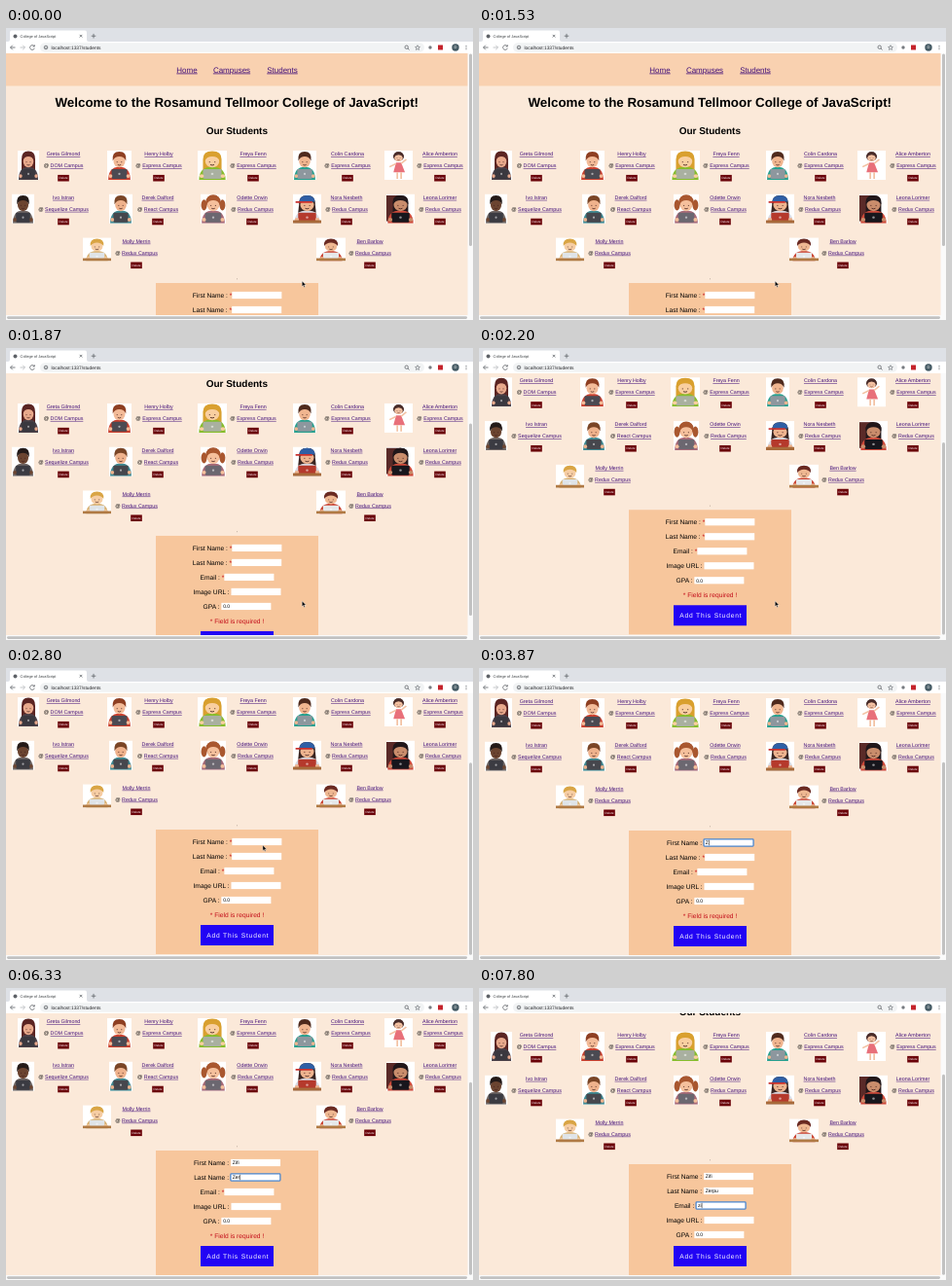
Animation, 480 px wide and 300 px high, one loop 8000 ms. Source, as an HTML page:

```html
<!DOCTYPE html>
<html lang="en">
<head>
<meta charset="utf-8">
<title>College of JavaScript</title>
<style>
  html, body { margin: 0; height: 100%; overflow: hidden; }
  svg { display: block; }
  #stage { width: 100vw; height: 100vh; font-family: "Liberation Sans", Arial, sans-serif; text-rendering: geometricPrecision; }
  .mid { text-anchor: middle; }
  .link { fill: #42107a; text-decoration: underline; }
  .label { font-size: 6.67px; }
  .red { fill: #c20a18; }
</style>
</head>
<body>
<svg id="stage" viewBox="0 0 480 300">
  <defs><clipPath id="view"><rect y="26" width="480" height="269"/></clipPath></defs>
  <rect width="480" height="300" fill="#fbe9d9"/>
  <g clip-path="url(#view)">
    <g id="page">
      <rect y="26" width="475" height="33.5" fill="#f9d1b0"/>
      <g class="link mid" font-size="8">
        <text x="186" y="45.500">Home</text><text x="232" y="45.500">Campuses</text><text x="284" y="45.500">Students</text>
      </g>
      <g class="mid" font-weight="bold">
        <text x="237.3" y="80.800" font-size="13.33">Welcome to the Rosamund Tellmoor College of JavaScript!</text>
        <text x="237.3" y="109.400" font-size="10">Our Students</text>
      </g>
      <g id="cards"></g>
      <rect x="237" y="257.500" width="1" height=".7" fill="#a9978a"/>
      <g id="form" transform="translate(0 262)">
        <rect id="panel" x="154" width="167" height="128" fill="#f7c69c"/>
        <text id="note" class="label mid red" x="237.5" y="89.700">* Field is required !</text>
        <g id="submit">
          <rect x="200" width="75" height="21" fill="#2204f4"/>
          <text class="label" x="206.200" y="12.900" fill="#fff" letter-spacing=".83">Add This Student</text>
        </g>
      </g>
    </g>
  </g>

  <rect x="474.5" y="26" width="5.5" height="270" fill="#fafafa"/>
  <rect id="thumb" x="476" width="3" rx="1.5" fill="#c1c1c1"/>
  <rect y="295" width="480" height="5" fill="#fafafa"/>
  <rect x="1" y="296.3" width="473" height="2.6" rx="1.3" fill="#c1c1c1"/>

  <rect width="480" height="14" fill="#dee1e6"/>
  <path d="M2 14q2 0 2-2V4.500q0-2 2-2h75q2 0 2 2V12q0 2 2 2z" fill="#fff"/>
  <rect y="14" width="480" height="12" fill="#fff"/>
  <rect x="35" y="15.300" width="395" height="9.400" rx="4.700" fill="#f1f3f4"/>
  <circle cx="9.500" cy="8.400" r="2" fill="#5f6368"/>
  <text x="14.600" y="9.900" font-size="3.9" fill="#3c4043">College of JavaScript</text>
  <text x="46.500" y="21.700" font-size="4.850" fill="#202124">localhost:1337/students</text>
  <g fill="none" stroke="#5f6368" stroke-width=".8">
    <path d="M75.700 6.900l2.600 2.600m0-2.600l-2.600 2.600M90 5.900v4.600m-2.300-2.300h4.600"/>
    <path d="M9.500 20h-5m2.300-2.300L4.500 20l2.300 2.300"/>
    <path d="M14.500 20h5m-2.300-2.300l2.300 2.300l-2.300 2.300" stroke="#b5b8bc"/>
    <path d="M29 18.700a2.400 2.400 0 1 0 .3 2M29.300 17.300v1.700h-1.700"/>
    <circle cx="41" cy="20" r="1.800"/><path d="M41 19.600v1.400"/>
    <circle cx="411.700" cy="19.700" r="1.700"/><path d="M413 21l1.500 1.500"/>
    <path d="M423 17.700l.7 1.600l1.700.2l-1.300 1.100l.4 1.800l-1.500-.9l-1.500.9l.4-1.800l-1.300-1.100l1.700-.2z" stroke-width=".6"/>
  </g>
  <circle cx="436" cy="20" r="1.700" fill="#777b80"/>
  <rect x="444" y="17.500" width="5" height="5" fill="#c4232b"/>
  <circle cx="462" cy="20" r="3.700" fill="#455a64"/>
  <text class="mid" x="462" y="21.400" font-size="4" fill="#fff">D</text>
  <g fill="#5f6368"><circle cx="473" cy="18.200" r=".55"/><circle cx="473" cy="20" r=".55"/><circle cx="473" cy="21.800" r=".55"/></g>

  <path id="pointer" d="M0 0v5.600l1.300-1.200l.9 2l.9-.4l-.9-1.900h1.800z" fill="#000" stroke="#fff" stroke-width=".4"/>
</svg>
<script>
const $ = id => document.getElementById(id);
const add = (parent, markup) => parent.insertAdjacentHTML('beforeend', markup);

// name, campus, centre x, row, picture x, picture width, skin, hair, shirt, laptop, look
const students = [
  ['Greta Gilmond', 'DOM', 59, 0, 12, 22, '#e8a98c', '#5b2523', '#4a4048', '#3a383f', 'long'],
  ['Henry Holby', 'Express', 157, 0, 104, 25, '#f3bb98', '#8e3f22', '#c9402f', '#4b4a52', 'short'],
  ['Freya Fenn', 'Express', 254, 0, 197, 30, '#f9cfa0', '#d9a02f', '#86bd2c', '#a9b0a0', 'long'],
  ['Colin Cardona', 'Express', 351, 0, 295, 24, '#f0b58f', '#4f2a1d', '#27a08f', '#8d979e', 'short'],
  ['Alice Amberton', 'Express', 446, 0, 389, 29, '#f3c1a2', '#4a2d2a', '#e8707a', '', 'stand'],
  ['Ivo Istran', 'Sequelize', 59, 1, 6, 23, '#6b4430', '#241a18', '#6f6664', '#3b3b42', 'short'],
  ['Derek Dalford', 'React', 156, 1, 106, 24, '#efb28c', '#7a4526', '#3f8a93', '#46474d', 'short'],
  ['Odette Orwin', 'Redux', 253, 1, 200, 26, '#f5c09c', '#a9572f', '#a86a78', '#6b6770', 'tails'],
  ['Nora Nesbeth', 'Redux', 350, 1, 295, 29, '#eeb48f', '#3a2522', '#d8d8e0', '#b5392c', 'cap'],
  ['Leona Lorimer', 'Redux', 446, 1, 391, 29, '#c98d6c', '#21171a', '#cf4a3a', '#17161c', 'office'],
  ['Molly Merrin', 'Redux', 134, 2, 79, 29, '#f6cda4', '#d9a545', '#d8b070', '#dfe4e8', 'desk'],
  ['Ben Barlow', 'Redux', 374, 2, 319, 30, '#efb892', '#6a2a22', '#c9402f', '#e6e8ea', 'desk'],
];

function portrait(skin, hair, shirt, laptop, look) {
  const face = `<ellipse cx="12" cy="11" rx="5.300" ry="5.600" fill="${skin}"/>
    <path d="M6 10.500q-1-8.500 6-8.500t6 8.500q-2-4-6-4t-6 4z" fill="${hair}"/>
    <path d="M10 11v1m4-1v1M10.500 14q1.500 1 3 0" stroke="#4a2520" stroke-width=".7" fill="none"/>`;
  if (look == 'stand') return `<g transform="translate(4.800 1) scale(.6)"><circle cx="12" cy="9" r="7" fill="${hair}"/>${face}</g>
    <path d="M10 12h4l3 9h-9z" fill="${shirt}"/><path d="M10 13l-5 3M14 13l4-4M11 21v6m3-6v6" stroke="${skin}" stroke-width="1.300"/>`;
  let back = '', front = '';
  if (look == 'long') back = `<path d="M5 20V9q0-7.500 7-7.500T19 9v11z" fill="${hair}"/>`;
  if (look == 'tails') back = `<g fill="${hair}"><circle cx="12" cy="8" r="6.500"/><ellipse cx="4" cy="11" rx="2.500" ry="5"/><ellipse cx="20" cy="11" rx="2.500" ry="5"/></g>`;
  if (look == 'cap') {
    back = `<path d="M5 18l1-11h12l1 11z" fill="${hair}"/>`;
    front = '<path d="M6 8q0-6 6-6t6 6z" fill="#2f5fa5"/><path d="M3 7.500h13V9H3z" fill="#c8302d"/><path d="M1 25h22v3H1z" fill="#a86a3a"/>';
  }
  if (look == 'office') back = `<path d="M1 2h11v24H1z" fill="#5a2a28"/><path d="M6 20V9q0-7 6-7t6 7v11z" fill="${hair}"/>`;
  if (look == 'desk') front = '<path d="M-1 24.500h26v3.500H-1z" fill="#b07a44"/>';
  return `${back}<path d="M2 28q0-12 10-12t10 12z" fill="${shirt}"/>${face}
    <rect x="5" y="18" width="14" height="9" rx="1" fill="${laptop}"/><circle cx="12" cy="22.500" r="1" fill="#fff8"/>
    <g fill="${skin}"><circle cx="4" cy="24.500" r="1.700"/><circle cx="20" cy="24.500" r="1.700"/></g>${front}`;
}

for (const [name, campus, x, row, picX, picW, ...look] of students) {
  const y = 126 + row * 44.8, h = row == 2 ? 24 : 30, span = row == 2 ? 26 : 22;
  const frame = `x="${picX}" y="${y}" width="${picW}" height="${h}"`;
  add($('cards'), `<rect ${frame} fill="#fff"/>
    <svg ${frame} viewBox="${12 - span / 2} 1 ${span} 27" preserveAspectRatio="none">${portrait(...look)}</svg>
    <g class="mid" font-size="5.33"><text class="link" x="${x}" y="${y + 5}">${name}</text>
    <text x="${x}" y="${y + 17}">@ <tspan class="link">${campus} Campus</tspan></text></g>
    <rect x="${x - 5.8}" y="${y + 24.9}" width="11.6" height="6.6" fill="#6a0208"/>
    <text class="mid" x="${x}" y="${y + 29.3}" font-size="3.1" fill="#fff">Delete</text>`);
}

const GAP = 1.85, STAR = 2.6, BOX = 51, LINE = 15;
const fields = [
  { label: 'First Name :', text: 'Zifi', keys: [3730, 4530, 4730, 4870], focus: [3400, 4930] },
  { label: 'Last Name :', text: 'Zerpu', keys: [5600, 5800, 6000, 6470, 6730], focus: [4930, 7000] },
  { label: 'Email :', text: 'zi', keys: [7270, 7600], focus: [7000, 8000] },
  { label: 'Image URL :' },
  { label: 'GPA :', fixed: '0.0' },
];
fields.forEach((field, i) => {
  add($('form'), `<g transform="translate(0 ${12.2 + i * LINE})"><text class="label" y="2.4">${field.label}</text>
    <text class="label red" y="2.4">*</text>
    <g><rect y="-3.300" width="${BOX}" height="7.200" fill="#fff"/>
    <text x="1.800" y="2.200" font-size="5"></text><rect y="-2.400" width=".5" height="5.400"/></g></g>`);
  const row = $('form').lastElementChild;
  [field.caption, field.star, field.input] = row.children;
  [field.box, field.value, field.caret] = field.input.children;
  field.width = field.caption.getComputedTextLength();
});

function drawField({ keys, focus = [], text, fixed, width, caption, star, input, box, value, caret }, t) {
  const pressed = keys ? keys.filter(k => t >= k) : [];
  const starred = keys && !pressed.length;
  const left = 237.5 - (width + GAP + (starred ? STAR : 0) + BOX) / 2;
  const boxX = left + width + GAP + (starred ? STAR : 0);
  caption.setAttribute('x', left);
  star.setAttribute('x', left + width + GAP);
  star.style.display = starred ? '' : 'none';
  input.setAttribute('transform', `translate(${boxX} 0)`);
  value.textContent = fixed || (text || '').slice(0, pressed.length);

  const active = t >= focus[0] && t < focus[1];
  box.setAttribute('stroke', active ? '#4a86cf' : 'none');
  box.setAttribute('stroke-width', 1.3);
  box.setAttribute('rx', active ? .8 : 0);
  const since = t - (pressed.at(-1) ?? focus[0]);
  caret.style.display = active && since % 1000 < 500 ? '' : 'none';
  caret.setAttribute('x', 2.1 + value.getComputedTextLength());
}

const easeOut = (t, start, length) => 1 - (1 - Math.min(1, Math.max(0, (t - start) / length))) ** 3;

function draw(t) {
  fields.forEach(field => drawField(field, t));

  // Once every required field is filled the note goes and the page gets shorter.
  const complete = t >= 7270, saved = complete ? 14 : 0;
  $('note').style.display = complete ? 'none' : '';
  $('submit').setAttribute('transform', `translate(0 ${98 - saved})`);
  $('panel').setAttribute('height', 128 - saved);

  const limit = (t < 3730 ? 96 : 95) - saved;
  const scroll = limit * easeOut(t, 1650, 640);
  const ratio = 269 / (269 + limit);
  $('page').setAttribute('transform', `translate(0 ${-scroll})`);
  $('thumb').setAttribute('y', 26.5 + scroll * ratio);
  $('thumb').setAttribute('height', 268 * ratio);

  const move = easeOut(t, 2270, 800);
  $('pointer').setAttribute('transform', `translate(${304.3 - 42 * move} ${260 - 81 * move})`);
  $('pointer').style.display = t < 3730 ? '' : 'none';
}

const begin = performance.now();
function tick() {
  draw((performance.now() - begin) % 8000);
  requestAnimationFrame(tick);
}
tick();
</script>
</body>
</html>
```
